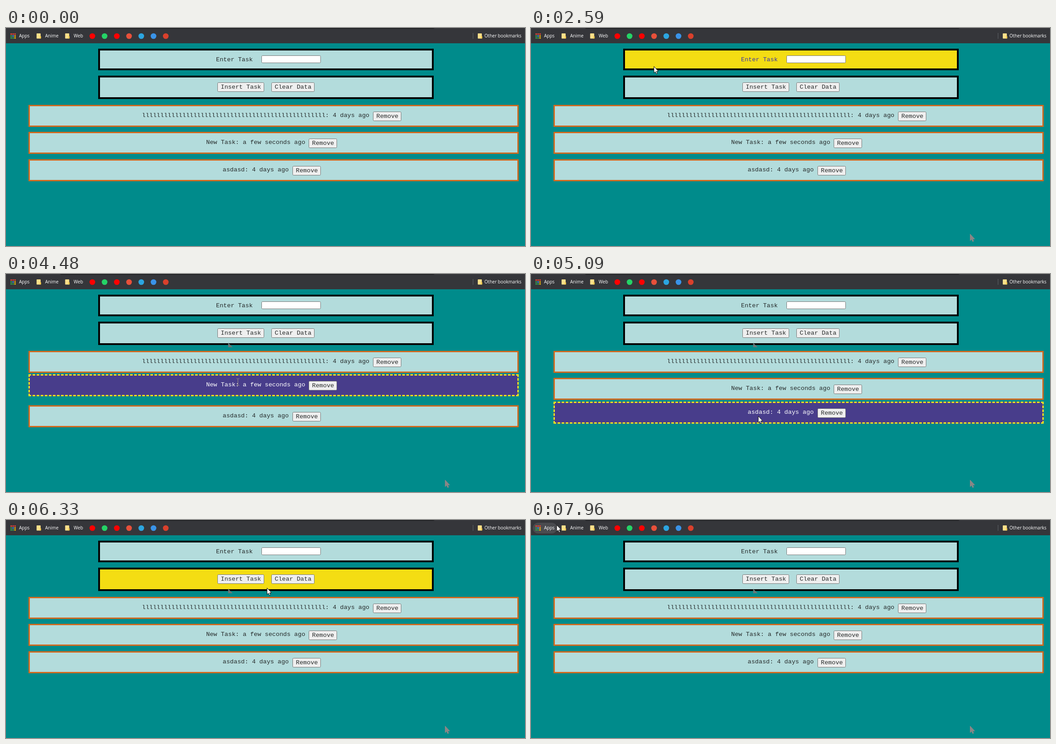
An HTML page for the animation above (8 s loop, 1154 by 485 pixels).

```html
<!DOCTYPE html>
<html lang="en">
<head>
<meta charset="utf-8">
<title>Task list</title>
<style>
  html, body { margin: 0; width: 100%; height: 100%; overflow: hidden; background: #008b8b; }
  svg { display: block; width: 1154px; height: 485px; }
  text { white-space: pre; }
  .mono { font: 13.6px "Liberation Mono", monospace; }
  .ui { font: 10px "Open Sans", sans-serif; fill: #fff; }
  .row { box-sizing: border-box; height: 49px; background: #b3dcdc; border: 3px solid #d2691e; }
  .row.over { background: #483d8b; border: 3px dashed #f5e11c; }
</style>
</head>
<body>
<svg id="stage" viewBox="0 0 1154 485"></svg>
<script>
const LOOP = 8000, STEP = 77.7, ENTER = 260;
const PALE = '#b3dcdc', GOLD = '#f4dd13', INK = '#262a2a';
const ARROW = 'M0 0V14.6L3.3 11.6L5.5 16.7L7.8 15.7L5.6 10.8H10Z';
const stage = document.getElementById('stage');

function set(node, attrs) {
  for (const key in attrs) node.setAttribute(key, attrs[key]);
}
function add(parent, tag, attrs, label) {
  const node = document.createElementNS('http://www.w3.org/2000/svg', tag);
  set(node, attrs);
  if (label) node.textContent = label;
  parent.appendChild(node);
  return node;
}
const rect = (parent, x, y, width, height, fill, more) =>
  add(parent, 'rect', { x, y, width, height, fill, ...more });
const mono = (parent, x, y, label) =>
  add(parent, 'text', { x, y, class: 'mono', fill: INK }, label);
const show = (node, on) => set(node, { visibility: on ? 'visible' : 'hidden' });

function button(parent, x, y, label) {
  rect(parent, x, y, Math.round(label.length * 8.16 + 13), 20, '#efefef', { stroke: '#767676', rx: 2 });
  mono(parent, x + 7, y + 13.7, label);
}

// Bookmarks bar
rect(stage, 0, 0, 1154, 34, '#35363a');
add(stage, 'path', { d: 'M120 0H953Q952 2 949 2H125Q121 2 120 0Z', fill: '#202124' });

function bookmark(x, width, label, icon) {
  const pill = rect(stage, x, 6, width, 24, '#4a4b4f', { rx: 12 });
  icon(x + 6);
  add(stage, 'text', { x: x + 25, y: 21.3, class: 'ui' }, label);
  return { x, width, pill };
}
function folder(x) {
  rect(stage, x, 12, 9, 11.5, '#ffe08a', { rx: 1 });
  rect(stage, x + 7, 18, 3, 5.5, '#f2c94c', { rx: 1 });
}
function grid(x) {
  const colors = { r: '#ea4335', g: '#34a853', b: '#4285f4', y: '#fbbc05' };
  [...'rrrgbyggy'].forEach((c, i) =>
    rect(stage, x + i % 3 * 4.3, 12 + Math.floor(i / 3) * 4.3, 3, 3, colors[c]));
}
const bookmarks = [
  bookmark(4, 54, 'Apps', grid),
  bookmark(62, 58, 'Anime', folder),
  bookmark(125.5, 52, 'Web', folder)
];
['#ff0000', '#25d366', '#ff0000', '#e8503a', '#2ca5e0', '#3a93e8', '#d9402c']
  .forEach((fill, i) => add(stage, 'circle', { cx: 192 + i * 27.2, cy: 18, r: 6.3, fill }));
rect(stage, 1038, 11, 1, 13, '#5f6368');
folder(1049);
add(stage, 'text', { x: 1146, y: 21.3, class: 'ui', 'text-anchor': 'end' }, 'Other bookmarks');

// Form panels
const panel = (y, height) =>
  rect(stage, 207, y + 2, 742, height - 4, PALE, { stroke: '#000', 'stroke-width': 4 });
const entry = panel(46, 48);
const entryLabel = mono(stage, 467, 73.5, 'Enter Task');
rect(stage, 568.5, 61.5, 131, 16, '#fff', { stroke: '#767676', rx: 2 });
const actions = panel(106, 52);
button(stage, 470.5, 121.5, 'Insert Task');
button(stage, 590.5, 121.5, 'Clear Data');

// Task rows, text and button centred together
const rows = ['l'.repeat(50) + ': 4 days ago', 'New Task: a few seconds ago', 'asdasd: 4 days ago']
  .map((label, i) => {
    const top = Math.round(171 + 60.4 * i);
    const width = label.length * 8.16, x = 590.7 - (width + 71) / 2;
    const g = add(stage, 'g', {});
    const frame = add(g, 'foreignObject', { x: 50, y: 0, width: 1090, height: 49 });
    const box = frame.appendChild(document.createElement('div'));
    const text = mono(g, x, 26.7, label);
    button(g, Math.round(x + width + 8) + 0.5, 15.5, 'Remove');
    return { top, x, end: x + width, g, box, text };
  });

// Marks the pointer leaves behind
const trace = add(stage, 'path', { d: ARROW, transform: 'translate(976.5 458.5)', fill: '#8a8686', stroke: '#8a8686' });
const chip = add(stage, 'path', { d: 'M494 153V163H504Z', fill: '#647878' });

const arrow = add(stage, 'path', { d: ARROW, fill: '#fff', stroke: '#111' });
const beam = add(stage, 'path', {
  d: 'M-3 -7.5H-1L0 -6.5L1 -7.5H3M0 -6.5V6.5M-3 7.5H-1L0 6.5L1 7.5H3',
  fill: 'none', stroke: '#a2957c'
});

// Turning points of the pointer: time, x, y
const path = [
  [270, 976, 458], [1190, 543, 49], [1890, 400, 130], [2210, 400, 130], [2290, 271, 90],
  [2590, 271, 85], [3300, 470, 133], [4470, 516, 241], [5100, 505, 318], [5960, 492, 338],
  [6330, 581, 150], [6720, 605, 97], [7580, 112, 11], [7960, 57, 11]
];

function pointer(t) {
  const last = path.length - 1;
  t = Math.min(Math.max(t, path[0][0]), path[last][0]);
  const i = Math.max(1, path.findIndex(p => p[0] >= t));
  const [t0, x0, y0] = path[i - 1], [t1, x1, y1] = path[i];
  const k = (t - t0) / (t1 - t0);
  return [x0 + (x1 - x0) * k, y0 + (y1 - y0) * k];
}

// The pose is held between even steps.
const snap = t => Math.floor((t - 22) / STEP) * STEP + 34;

function draw(t) {
  const held = snap(t), active = held > ENTER;
  const [x, y] = pointer(held);
  const within = (x0, x1, y0, y1) => active && x >= x0 && x <= x1 && y >= y0 && y <= y1;

  const onEntry = within(205, 951, 46, 94);
  set(entry, { fill: onEntry ? GOLD : PALE });
  set(entryLabel, { fill: onEntry ? '#3a35a8' : INK });
  set(actions, { fill: within(205, 951, 106, 158) ? GOLD : PALE });
  bookmarks.forEach(b => show(b.pill, within(b.x, b.x + b.width, 6, 30)));

  let onText = within(467, 549, 62, 76);
  for (const r of rows) {
    const over = within(50, 1140, r.top, r.top + 45);
    set(r.g, { transform: `translate(0 ${r.top - (over ? 8 : 0)})` });
    r.box.className = over ? 'row over' : 'row';
    set(r.text, { fill: over ? '#fff' : INK });
    onText = onText || within(r.x, r.end, r.top + 5, r.top + 23);
  }

  show(trace, held > ENTER + STEP);
  show(chip, held > 3600);
  show(arrow, active && !onText);
  show(beam, onText);
  const transform = `translate(${x.toFixed(1)} ${y.toFixed(1)})`;
  set(arrow, { transform });
  set(beam, { transform });
}

const begin = performance.now();
function tick() {
  draw((performance.now() - begin) % LOOP);
  requestAnimationFrame(tick);
}
tick();
</script>
</body>
</html>
```
